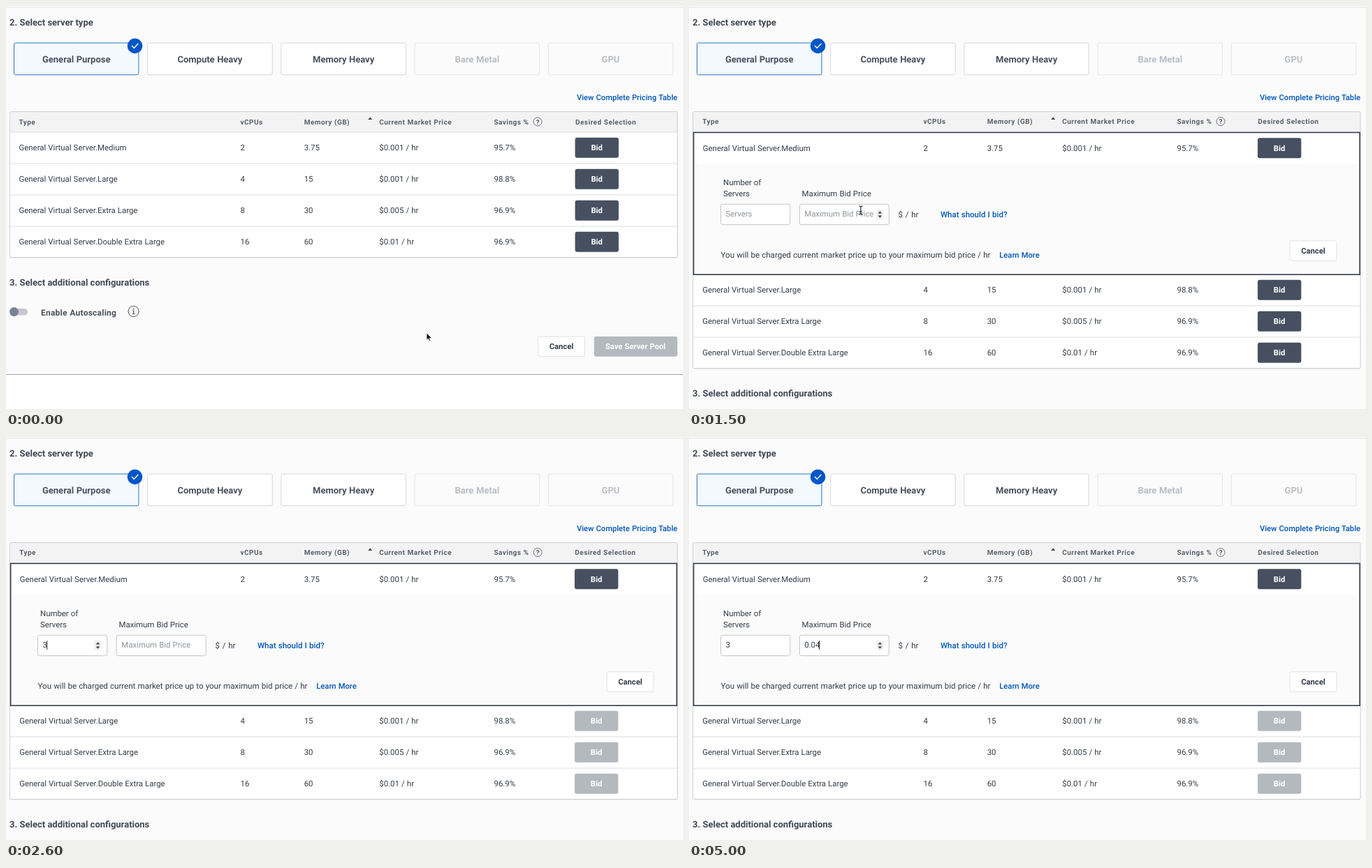
Write an HTML page that moves like this. It is 969 by 578 pixels and loops after 5.38 s.

```html
<!DOCTYPE html>
<html lang="en">
<head>
<meta charset="utf-8">
<title>Server bid form</title>
<style>
  html, body { margin: 0; width: 100%; height: 100%; overflow: hidden; background: #fff; }
  svg { display: block; }
  text {
    font: 11.4px Roboto, "Noto Sans", sans-serif; fill: #353c49; white-space: pre;
    word-spacing: .3px; text-rendering: geometricPrecision;
  }
  .title { font-size: 13px; font-weight: 700; fill: #424957; word-spacing: 0; }
  .tab { font-size: 13px; font-weight: 700; fill: #4b525e; text-anchor: middle; }
  .off { fill: #babec4; }
  .head { font-size: 10px; font-weight: 700; letter-spacing: .46px; fill: #59606c; }
  .link { font-size: 11.2px; font-weight: 500; fill: #0055b8; }
  .ask { font-size: 11.5px; }
  .note { font-size: 11.55px; }
  .unit { word-spacing: 1px; }
  .hint { fill: #8f949b; }
  .toggle { font-size: 12px; font-weight: 700; letter-spacing: .24px; fill: #4b525e; }
  .btn { font-size: 11.2px; font-weight: 700; text-anchor: middle; }
  .light { fill: #fff; }
  .icon { font-size: 9.5px; font-weight: 500; text-anchor: middle; }
</style>
</head>
<body>
<svg id="stage" width="969" height="578" viewBox="0 0 969 578"></svg>
<script>
const LOOP = 5380, STEP = 100, GROW = 159;
const OPEN = 1000, TYPED = 2500, TABBED = 3000;
const stage = document.getElementById('stage');

const TABS = ['General Purpose', 'Compute Heavy', 'Memory Heavy', 'Bare Metal', 'GPU'];
const COLS = [18.5, 335.5, 426.7, 534.3, 698.5];
const HEADS = ['Type', 'vCPUs', 'Memory (GB)', 'Current Market Price', 'Savings %'];
const ROWS = [
  ['Medium', '2', '3.75', '$0.001 / hr', '95.7%'],
  ['Large', '4', '15', '$0.001 / hr', '98.8%'],
  ['Extra Large', '8', '30', '$0.005 / hr', '96.9%'],
  ['Double Extra Large', '16', '60', '$0.01 / hr', '96.9%']
];
// [time, text, caret x]
const PRICE = [[3900, '0', 171.5], [4200, '0.', 174.5], [4600, '0.0', 181], [5000, '0.04', 186.5]];

const text = (x, y, s, cls = '') => `<text x="${x}" y="${y}" class="${cls}">${s}</text>`;
const rect = (x, y, w, h, fill, stroke = 'none', r = 0, sw = 1) =>
  `<rect x="${x}" y="${y}" width="${w}" height="${h}" rx="${r}" fill="${fill}" stroke="${stroke}" stroke-width="${sw}"/>`;
const path = (d, fill, stroke = 'none', sw = 1) =>
  `<path d="${d}" fill="${fill}" stroke="${stroke}" stroke-width="${sw}" stroke-linejoin="round" stroke-linecap="round"/>`;
const circle = (x, y, r, fill, stroke = 'none') =>
  `<circle cx="${x}" cy="${y}" r="${r}" fill="${fill}" stroke="${stroke}"/>`;
const line = (x, y, w, color) => rect(x, y, w, 1, color);
const move = (x, y, body) => `<g transform="translate(${x} ${y})">${body}</g>`;

const inOut = p => p < .5 ? 4 * p ** 3 : 1 - 4 * (1 - p) ** 3;
const out = p => 1 - (1 - p) ** 3;
const inside = (p, x, y, w, h) => p.x >= x && p.x <= x + w && p.y >= y && p.y <= y + h;

function pointer(t) {
  if (t <= OPEN) {
    const p = inOut(Math.min(t / 650, 1));
    return { x: 602 + 231 * p, y: 469 - 266 * p };
  }
  const p = Math.min((t - OPEN) / 800, 1);
  return { x: 833 - 744 * inOut(p), y: 203 + 95 * out(p) };
}

function cursor(p, kind) {
  const shapes = {
    arrow: path('M0 0V10.3L2.4 8.1 4 11.6 5.6 10.9 4.1 7.5H7.3Z', '#111', '#fff', .8),
    hand: path('M-1-.3Q.2-1.3 1 0L2.2 3.3 3.3 2.7 4.6 3.2 6 3.5Q6.7 5 6.6 7L5.8 10H1L-1.6 6.7Q-2.2 5.3-.8 5.4L.2 6Z', '#fff', '#111', .9),
    beam: path('M-2.5-6Q0-6 0-4.5Q0-6 2.5-6M0-4.5V4.5M-2.5 6Q0 6 0 4.5Q0 6 2.5 6M-1.3 1.5H1.3', 'none', '#222', 1.1)
  };
  return move(p.x, p.y, shapes[kind]);
}

function tabs() {
  return TABS.map((name, i) => {
    const x = 11.5 + 191.2 * i, off = i > 2;
    return rect(x, 53, 178.4, 45.7, i ? off ? '#fbfbfb' : '#fff' : '#f2f9ff',
        i ? off ? '#e6e7e8' : '#d5d7d9' : '#2f76bd', 2) +
      text(x + 89.2, 80.5, name, off ? 'tab off' : 'tab');
  }).join('') + circle(184.5, 57.2, 10.7, '#0056c8') +
    path('M180.3 57.3L183.2 60.2 189 54.2', 'none', '#fff', 1.5);
}

function header(open) {
  const heads = HEADS.map((s, i) => text(COLS[i] + (i ? 0 : open * .7), 169.8 - open * .5, s, 'head')).join('');
  return rect(5.5, 151.5, 955.5, 29.5, '#f3f3f4') + heads +
    text(815 - open * .7, 169.8 - open * .5, 'Desired Selection', 'head') +
    path('M518.2 163L521.2 159.2 524.2 163Z', '#424957') +
    circle(761, 166 - open * .5, 6, 'none', '#6a717c') + text(761, 169.5 - open * .5, '?', 'icon');
}

function row(i, y, open, hover, fill) {
  const own = open && !i, dx = open ? own ? 1.3 : .7 : 0, base = y + 26 + own * .5;
  const cells = ROWS[i].map((s, c) =>
    text(COLS[c] + (c ? 0 : dx), base, c ? s : 'General Virtual Server.' + s)).join('');
  const bx = open ? 813.9 : 814.5, by = y + 7.8 + own * .5;
  return rect(6, y, 954.5, 45, hover ? '#f3f3f4' : '#fff') + cells +
    rect(bx, by, 62.4, 29, fill, 'none', 3) + text(bx + 31.1, by + 18.2, 'Bid', 'btn light');
}

function spinner(x) {
  return rect(x - 5, 292, 10, 14, '#f0f0f0', 'none', 2) +
    path(`M${x - 2.8} 297.5L${x} 294.3 ${x + 2.8} 297.5ZM${x - 2.8} 300.5L${x} 303.7 ${x + 2.8} 300.5Z`, '#3c3c3c');
}

const caret = x => rect(x - .5, 292, 1, 13, '#333');

function field(x, w, value, hint) {
  return rect(x, 284.2, w, 29.5, '#fff', '#c2c5c9', 3) +
    text(x + 7, 302.2, value || hint, value ? '' : 'hint');
}

const cancel = (x, y) => rect(x, y, 67, 28.5, '#fff', '#e0e2e4', 2) + text(x + 33.5, y + 18, 'Cancel', 'btn');

function panel(t, p) {
  const price = PRICE.filter(k => t >= k[0]).pop();
  const mouse = t < TYPED, tabbed = t >= TABBED;
  const overA = mouse && inside(p, 45, 284, 100, 30), overB = mouse && inside(p, 158, 284, 128, 30);
  let bar = 0;
  if (t >= 2000 && t < 3100) bar = t < TYPED ? 53.5 : 58.7;
  else if (price) bar = price[2];
  else if (t >= 3100 && t < 3600) bar = 166;
  return rect(6, 226, 954.5, 159, '#fbfbfb') +
    text(49, 257, 'Number of') + text(49, 273, 'Servers') + text(161.5, 273, 'Maximum Bid Price') +
    field(45.5, 99.3, t >= TYPED ? '3' : '', 'Servers') +
    field(158.2, 128, price ? price[1] : '', 'Maximum Bid Price') +
    (overA || (t >= 1800 && !tabbed) ? spinner(131.5) : '') +
    (overB || tabbed ? spinner(273.3) : '') + (bar ? caret(bar) : '') +
    text(299.5, 303, '$ / hr', 'unit') + text(360, 303, 'What should I bid?', 'link ask') +
    text(45.5, 361, 'You will be charged current market price up to your maximum bid price / hr', 'note') +
    text(444.3, 361, 'Learn More', 'link') + cancel(860, 336.8);
}

function footer() {
  return text(5, 401.3, '3. Select additional configurations', 'title') +
    rect(7, 434, 24, 9.6, '#c6c8cc', 'none', 4.8) + circle(11.5, 438.6, 6.5, '#7b8291') +
    text(50, 443.8, 'Enable Autoscaling', 'toggle') +
    circle(182.6, 438, 7.6, 'none', '#4b525e') +
    path('M181.4 437H182.8V441.4M181.2 441.5H184.4', 'none', '#4b525e', 1.1) + circle(182.5, 434.4, .9, '#4b525e') +
    cancel(761.5, 474.3) + rect(841.7, 474, 119.3, 28.8, '#b4b9c0', 'none', 3) +
    text(901, 492.2, 'Save Server Pool', 'btn light') +
    line(0, 528, 969, '#a3a5a8') + rect(0, 529, 969, 50, '#fff');
}

function draw(t) {
  const p = pointer(t), open = +(t >= OPEN), grow = open * GROW, mouse = t < TYPED;
  const onButton = t >= 600 && t <= OPEN;
  const disabled = t < TYPED ? '#465060' : t < 2600 ? '#7d8590' : '#b4b9c0';
  const rows = ROWS.map((_, i) => {
    const y = 181 + 45 * i + (i ? grow : 0);
    const hover = mouse && inside(p, 6, y, 954, 44.9);
    const fill = hover && onButton ? '#525b6a' : i ? disabled : '#465060';
    return row(i, y, open, hover, fill);
  }).join('');
  const rules = ROWS.map((_, i) => i || !open ? line(6, 180.5 + 45 * i + grow, 954.5, '#dcdee0') : '').join('');
  const inField = open && (inside(p, 45, 284, 100, 30) || inside(p, 158, 284, 128, 30));
  const kind = onButton ? 'hand' : inField ? 'beam' : 'arrow';
  stage.innerHTML = rect(0, 0, 969, 578, '#fbfbfb') + line(0, 1.5, 969, '#dedfe0') +
    text(5, 28.3, '2. Select server type', 'title') + tabs() +
    `<g text-anchor="end">${text(961, 135.2, 'View Complete Pricing Table', 'link')}</g>` +
    rect(5.5, 152.3, 955.5, 209 + grow, '#fff', '#e6e7e8', 2) +
    header(open) + rows + rules + (open ? panel(t, p) : '') +
    rect(5.5, 151.5, 955.5, 209 + grow, 'none', '#cfd1d3', 2) +
    (open ? rect(6.6, 181.4, 953.5, 203.8, 'none', '#363d4a', 0, 1.6) : '') +
    move(0, grow, footer()) + (mouse ? cursor(p, kind) : '');
}

let last = -1;
const start = performance.now();
function tick() {
  const t = Math.floor((performance.now() - start) % LOOP / STEP) * STEP;
  if (t !== last) draw(last = t);
  requestAnimationFrame(tick);
}
tick();
</script>
</body>
</html>
```
